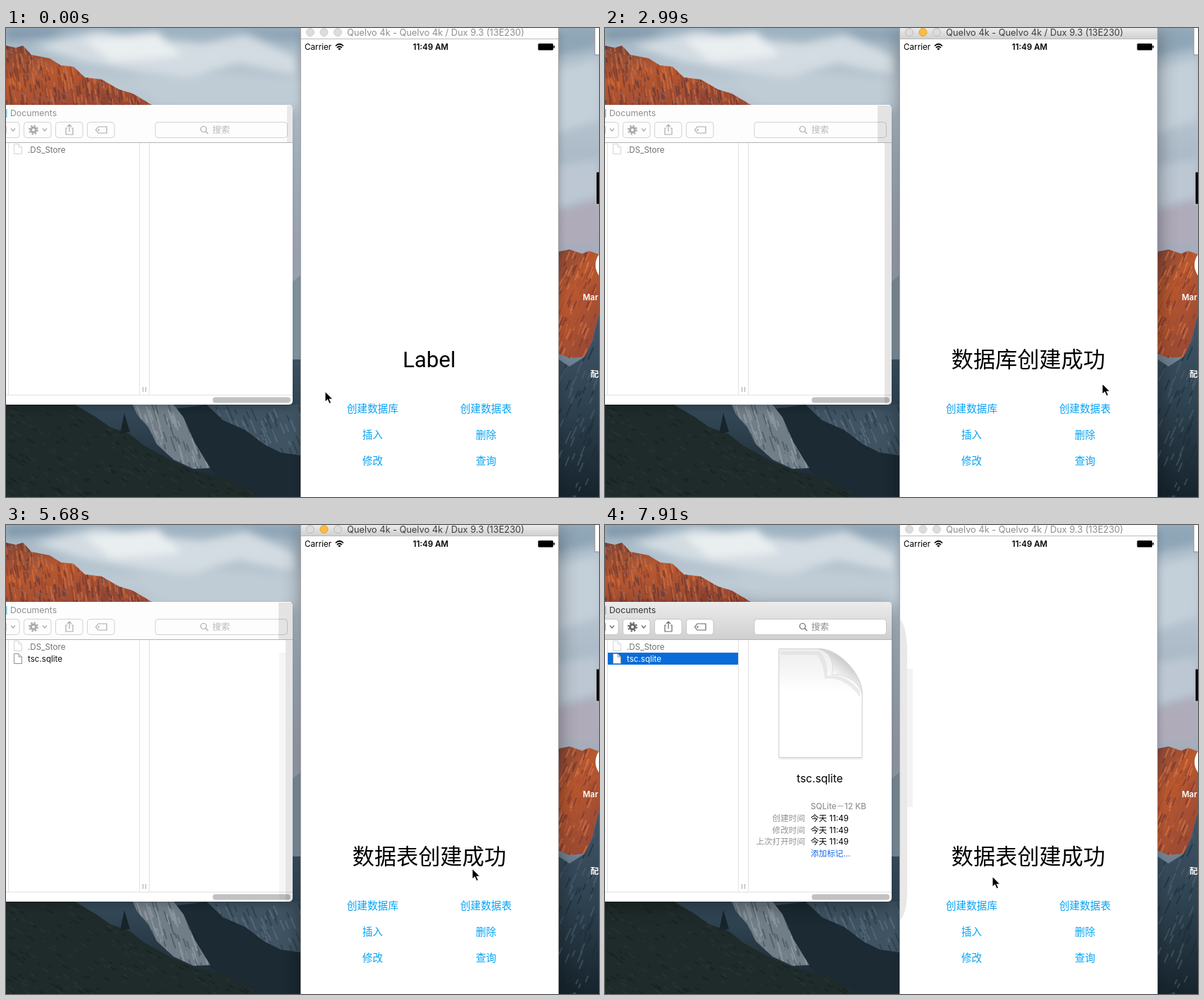
These frames come from a looping animation (842x665 px, 8 s). An HTML page:

```html
<!DOCTYPE html>
<html lang="zh">
<head>
<meta charset="utf-8">
<title>Database demo</title>
<style>
html, body { margin: 0; width: 100%; height: 100%; overflow: hidden; }
svg { display: block; width: 100vw; height: 100vh; font-family: Inter, "Noto Sans CJK SC", "Noto Sans CJK", sans-serif; }
.mid { text-anchor: middle; }
.end { text-anchor: end; }
.big { font: 31.2px Roboto, "Noto Sans CJK SC", "Noto Sans CJK", sans-serif; }
.button { font-size: 14.6px; fill: #06a3f5; }
.small { font-size: 11.6px; }
.bar { fill: #fdfdfd; }
.finder .fbar { fill: url(#chrome); }
.sim .sbar { fill: url(#chrome); }
.title { fill: #8e8e8e; }
.finder .ftitle { fill: #333; }
.sim .stitle { fill: #3c3c3c; }
.tool rect { fill: #fdfdfd; stroke: #d2d2d2; }
.finder .tool rect { fill: #fff; stroke: #c6c6c6; }
.glyph { fill: none; stroke: #aaa; stroke-width: 1.2; }
.finder .glyph { stroke: #686868; }
.search { font-size: 12.5px; fill: #b9b9b9; }
.finder .search { fill: #8c8c8c; }
.light { fill: #dcdcdc; stroke: #cfcfcf; }
.sim .light { stroke: #bcbcbc; }
.sim .yellow { fill: #fdbc40; stroke: #e0a135; }
.shade, .sim .idle-shade, .finder .idle-shade { display: none; }
.sim .sim-shade, .finder .finder-shade { display: inline; }
.shadow { opacity: .22; filter: url(#soft6); }
.sim .sim-shadow, .finder .finder-shadow { opacity: .4; filter: url(#soft14); }
</style>
</head>
<body>
<svg id="stage" viewBox="0 0 842 665" preserveAspectRatio="none">
<defs>
  <linearGradient id="sky" x2="0" y2="1">
    <stop stop-color="#9db1c0"/><stop offset=".12" stop-color="#bdcad4"/><stop offset=".3" stop-color="#a9b8c6"/>
    <stop offset=".48" stop-color="#a5acbb"/><stop offset=".6" stop-color="#9fb0bd"/><stop offset=".75" stop-color="#5b7080"/>
  </linearGradient>
  <linearGradient id="rock" x2=".6" y2="1">
    <stop stop-color="#7a4438"/><stop offset=".45" stop-color="#b9582f"/><stop offset="1" stop-color="#9a4a35"/>
  </linearGradient>
  <linearGradient id="slate" x2="0" y2="1">
    <stop stop-color="#40566a"/><stop offset=".5" stop-color="#2f4250"/><stop offset="1" stop-color="#16232b"/>
  </linearGradient>
  <linearGradient id="chrome" x2="0" y2="1"><stop stop-color="#ebebeb"/><stop offset="1" stop-color="#d0d0d0"/></linearGradient>
  <linearGradient id="curl" x1=".1" y1="1" x2=".7" y2=".2">
    <stop stop-color="#d4d4d4"/><stop offset=".45" stop-color="#fff"/><stop offset="1" stop-color="#bfbfbf"/>
  </linearGradient>
  <linearGradient id="page" x2="0" y2="1"><stop stop-color="#ededed"/><stop offset=".4" stop-color="#fff"/></linearGradient>
  <filter id="soft1"><feGaussianBlur stdDeviation="1.5"/></filter>
  <filter id="soft6" x="-30%" y="-30%" width="160%" height="160%"><feGaussianBlur stdDeviation="6"/></filter>
  <filter id="soft14" x="-30%" y="-30%" width="160%" height="160%"><feGaussianBlur stdDeviation="14"/></filter>
  <clipPath id="cliffClip"><path id="cliff" d="M0 25L14 28L24 25L36 38L62 43L78 53L96 55L112 70L136 73L160 87L180 93L207 109H0Z"/></clipPath>
  <clipPath id="eastClip"><path id="east" d="M780 318L800 314L818 320L828 316L842 321V405L832 445L822 466L800 468L780 460Z"/></clipPath>
  <clipPath id="faceClip"><path id="face" d="M180 534H238L252 552L268 588L290 624L266 625L238 612L214 590L202 566L186 548Z"/></clipPath>
  <clipPath id="woodClip"><path id="wood" d="M0 534H98L128 552L148 566L176 576L196 592L236 614L270 628L318 640L360 665H0Z"/></clipPath>
  <clipPath id="spurClip"><path id="spur" d="M285 534H419V606L390 602L366 590L340 570L308 556Z"/></clipPath>
  <clipPath id="peakClip"><path id="peak" d="M842 405L832 445L822 466L800 480L785 470V665H842Z"/></clipPath>
  <g id="doc"><path d="M.5.5H7L11.5 5V14.5H.5Z" fill="#fff"/><path d="M7 .5V5H11.5" fill="none"/></g>
</defs>

<rect width="842" height="665" fill="url(#sky)"/>
<g filter="url(#soft6)">
  <path d="M0 0H90L60 12L0 18Z" fill="#8199ac"/>
  <path d="M330 0H420V20L370 16Z" fill="#90a6b7"/>
  <path d="M40 26L130 4L190 14L280 22L340 10L410 40L410 66L330 50L260 70L190 62L110 48Z" fill="#d3dce2"/>
  <path d="M110 16L215 6L250 40L150 48Z" fill="#e9eef0"/>
  <path d="M180 72L300 66L420 78V108H220Z" fill="#c0ccd5"/>
  <path d="M780 0H842V26L780 40Z" fill="#8fa6b7"/>
  <path d="M780 60L842 42V130L780 150Z" fill="#c3cfd9"/>
  <path d="M780 195L842 185V240L780 256Z" fill="#bcc7d3"/>
  <path d="M780 262L842 242V306H780Z" fill="#b0abb9"/>
</g>
<use href="#cliff" fill="url(#rock)"/>
<use href="#east" fill="url(#rock)"/>
<path d="M400 365L419 350V500L400 470Z" fill="#879aa8"/>
<path d="M0 470H419V665H0Z" fill="url(#slate)"/>
<path d="M240 540L285 534L308 556L340 570L390 602L419 606V665H340L290 626Z" fill="#1b2a33"/>
<use href="#spur" fill="#3f5362"/>
<use href="#face" fill="#717e88"/>
<use href="#wood" fill="#1f2b2a"/>
<path d="M162 575L168 546L176 573Z" fill="#17242a"/>
<use href="#peak" fill="url(#slate)"/>
<g id="texture" fill="none"></g>

<path d="M836 -2H850V38H836Z" fill="#fff" stroke="#8d8d8d"/>
<rect x="838" y="204" width="10" height="46" fill="#080808" stroke="#c9c9c9"/>
<circle cx="862" cy="336" r="25" fill="#fff"/>
<g fill="#fff" font-size="11.5" font-weight="600"><text x="819" y="386">Mar</text><text x="830" y="495">配</text></g>

<rect class="shadow finder-shadow" x="-40" y="118" width="447" height="420"/>
<rect class="shadow sim-shadow" x="419" y="6" width="366" height="690"/>

<!-- file browser -->
<rect x="-20" y="109" width="427" height="425" rx="5" fill="#fff"/>
<path class="bar fbar" d="M0 162V109H402Q407 109 407 114V162Z"/>
<path d="M0 162.5H407" stroke="#b4b4b4"/>
<rect x="0" y="115" width="1.5" height="12" fill="#7cc4e2"/>
<text class="title ftitle" x="6" y="125" font-size="12.3">Documents</text>
<g class="tool">
  <rect x="-20" y="133.5" width="39" height="22" rx="4"/><rect x="25.5" y="133.5" width="38.5" height="22" rx="4"/>
  <rect x="70.5" y="133.5" width="38.5" height="22" rx="4"/><rect x="115.5" y="133.5" width="38.5" height="22" rx="4"/>
  <rect x="212" y="133.5" width="187.5" height="22" rx="4"/>
</g>
<g class="glyph">
  <path d="M0 139V150M7 142.500L10 146L13 142.500M52 142.500L55 146L58 142.500"/>
  <circle cx="39" cy="144.5" r="3.5" stroke-width="3"/><circle cx="39" cy="144.5" r="6" stroke-width="2" stroke-dasharray="2.3 2.412"/>
  <path d="M87 142H85V151H95V142H93M90 147V137M87 140L90 137L93 140"/>
  <path d="M131 140H143V149H131L127.5 144.5Z"/><circle cx="131.5" cy="144.5" r=".6"/>
  <circle cx="280.5" cy="143.5" r="4"/><path d="M283.5 146.5L287 150"/>
</g>
<text class="search" x="293" y="149">搜索</text>
<path d="M3.5 163V520M189.5 163V520M203.5 163V520M0 520.5H407" stroke="#e2e2e2"/>
<path d="M194.5 509V516M198.5 509V516" stroke="#aaa"/>
<rect x="293.5" y="523.5" width="110.5" height="8" rx="4" fill="#c1c1c1"/>
<use href="#doc" x="11" y="164" stroke="#d5d5d5"/>
<text class="small" x="31" y="176.5" fill="#707070">.DS_Store</text>
<g id="file">
  <rect id="row" x="4" y="181" width="185" height="17" fill="#0a6cd8"/>
  <use href="#doc" x="11" y="182" stroke="#929292"/>
  <text id="fileName" class="small" x="31" y="194">tsc.sqlite</text>
</g>
<g id="preview">
  <path d="M247 176H308C334 178 365 212 365 239V330H247Z" fill="#999" filter="url(#soft1)" opacity=".35" transform="translate(0 1.5)"/>
  <path d="M247 175.5H306C334 177 365 212 365 239V329.5H247Z" fill="url(#page)" stroke="#d3d3d3"/>
  <path d="M250 179H305Q318 194 315 214Q342 210 362 235V244Q340 214 312 218Q309 191 300 184H250Z" fill="#dedede" opacity=".6"/>
  <path d="M302 175.5C320 180 326 195 322 212C342 211 360 222 365 239C364 211 334 177 302 175.5Z" fill="url(#curl)" stroke="#cfcfcf" stroke-width=".7"/>
  <text class="mid" x="305" y="365" font-size="15.5">tsc.sqlite</text>
  <g class="small">
    <text x="292" y="402.5" fill="#929292" font-weight="500">SQLite－12 KB</text>
    <g id="dates"></g>
    <text x="292" y="470" fill="#1a66e8">添加标记...</text>
  </g>
</g>
<rect class="idle-shade" x="399" y="110" width="8" height="52" opacity=".08"/>
<g class="shade sim-shade">
  <path d="M387 110H407V162H387ZM397 163H407V533H397Z" opacity=".1"/>
  <path id="lateShade" d="M388 181H397V533H388Z" opacity=".035"/>
</g>

<!-- phone simulator -->
<rect x="418.5" y="-5" width="366" height="680" fill="#fff" stroke="#a9a9a9"/>
<path class="bar sbar" d="M419 0H784V15H419Z"/>
<path d="M419 15.5H784" stroke="#bcbcbc"/>
<circle class="light" cx="432" cy="6" r="5.5"/><circle class="light yellow" cx="451.5" cy="6" r="5.5"/><circle class="light" cx="471" cy="6" r="5.5"/>
<text class="title stitle mid" x="610" y="10.5" font-size="12.8">Quelvo 4k - Quelvo 4k / Dux 9.3 (13E230)</text>
<text x="424" y="31" font-size="11.7">Carrier</text>
<path d="M468 25.5Q473.5 20 479 25.5M470 28Q473.5 24.5 477 28" fill="none" stroke="#000" stroke-width="1.7"/>
<path d="M471.3 29.3Q473.5 27.5 475.7 29.3L473.5 31.5Z"/>
<text class="mid" x="603" y="31" font-size="11.5" font-weight="600">11:49 AM</text>
<rect x="755.5" y="22" width="21.5" height="9.5" rx="1.5"/><rect x="777.5" y="25" width="1.5" height="3.5"/>
<g class="shade finder-shade">
  <path d="M419 133Q429 146 429 180V520Q429 550 419 560Z" fill="#e8e8e8"/>
  <path id="previewShade" d="M429 204H437V400H429Z" fill="#f3f3f3"/>
</g>
<text id="label" class="big mid" x="601" y="481">Label</text>
<g id="buttons" class="button mid"></g>

<path id="cursor" d="M0 0V15.5L3.6 12.2L6 17.8L8.8 16.6L6.4 11.2H11Z" stroke="#fff" stroke-width="1.1"/>
</svg>
<script>
const $ = id => document.getElementById(id);
const LOOP = 8000, STEP = 149.4;

// Cursor tip as [step, x, y]
const path = [
  [0, 453, 515], [4, 541, 550], [7, 511, 541], [8, 513, 539], [14, 513, 539],
  [18, 622, 501], [20, 706, 504], [22, 706, 504], [24, 690, 601], [26, 688, 540],
  [29, 688, 540], [31, 542, 504], [32, 500, 490], [35, 681, 490], [38, 662, 487],
  [42, 105, 201], [43, 81, 209], [44, 72, 189], [47, 72, 189], [50, 530, 380],
  [51, 568, 440], [53, 550, 498]
];

let seed = 7;
const random = () => (seed = seed * 16807 % 2147483647) / 2147483647;

// Soft short strokes that give the rocks and trees their grain
function grain(clip, count, [x, y, w, h], [dx, dy], colors) {
  for (const color of colors) {
    let d = "";
    for (let i = 0; i < count; i++) {
      const k = .4 + random();
      d += `M${x + random() * w} ${y + random() * h}l${dx * k} ${dy * k}`;
    }
    $("texture").innerHTML += `<path clip-path="url(#${clip})" d="${d}" stroke="${color}" stroke-width="2" opacity=".6"/>`;
  }
}
grain("cliffClip", 130, [0, 20, 205, 90], [2, 13], ["#54343a", "#d87642", "#8a3f2c"]);
grain("cliffClip", 50, [0, 20, 205, 90], [7, 4], ["#8b6a6b"]);
grain("eastClip", 40, [785, 310, 57, 160], [-5, 12], ["#6b3537", "#e27c49", "#a14a31"]);
grain("faceClip", 55, [180, 534, 110, 90], [6, 18], ["#3f4f5b", "#9aa4ab"]);
grain("spurClip", 45, [285, 534, 134, 75], [6, 14], ["#263743", "#637785"]);
grain("peakClip", 50, [785, 405, 57, 260], [-6, 14], ["#1c2b36", "#4c6172"]);
grain("woodClip", 140, [0, 534, 350, 130], [7, 4], ["#131f1f", "#2b3832"]);

const buttons = ["创建数据库", "创建数据表", "插入", "删除", "修改", "查询"].map((name, i) => {
  $("buttons").insertAdjacentHTML("beforeend",
    `<text x="${i % 2 ? 681.5 : 520.5}" y="${545 + 37 * (i >> 1)}">${name}</text>`);
  return $("buttons").lastChild;
});
$("dates").innerHTML = ["创建时间", "修改时间", "上次打开时间"].map((name, i) => {
  const y = 420 + 16.7 * i;
  return `<text class="end" x="284" y="${y}" fill="#929292">${name}</text>
    <text x="292" y="${y}">今天 11:49</text>`;
}).join("");

function cursorAt(step) {
  const next = path.findIndex(p => p[0] >= step);
  if (next < 1) return path[next < 0 ? path.length - 1 : 0].slice(1);
  const [a, b] = [path[next - 1], path[next]];
  const k = (step - a[0]) / (b[0] - a[0]);
  return [1, 2].map(i => Math.round(a[i] + (b[i] - a[i]) * k));
}

const show = (id, on) => $(id).style.display = on ? "inline" : "none";

function draw(now) {
  const step = Math.min(53, Math.floor((now % LOOP + 12) / STEP));
  const selected = step >= 46;
  $("stage").setAttribute("class", step < 11 ? "idle" : step < 43 ? "sim" : "finder");
  $("label").textContent = step < 13 ? "Label" : step < 29 ? "数据库创建成功" : "数据表创建成功";
  buttons[0].style.opacity = step === 12 ? .2 : 1;
  buttons[1].style.opacity = step === 28 ? .2 : 1;
  show("file", step >= 30);
  show("lateShade", step >= 30);
  for (const id of ["row", "preview", "previewShade"]) show(id, selected);
  $("fileName").style.fill = selected ? "#fff" : "#111";
  $("cursor").setAttribute("transform", `translate(${cursorAt(step)})`);
  requestAnimationFrame(draw);
}
requestAnimationFrame(draw);
</script>
</body>
</html>
```
